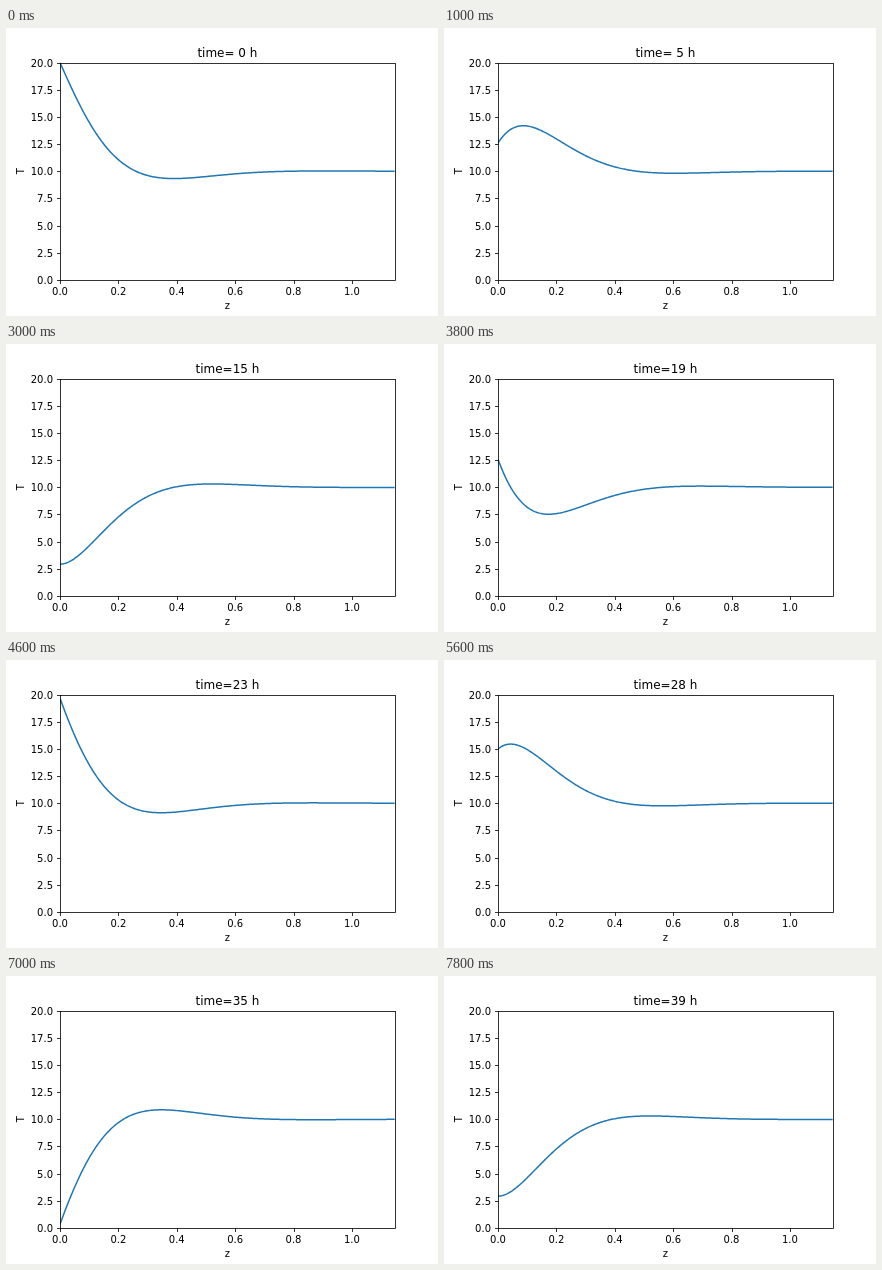
Animation of 432x288 px, one loop 8000 ms. Source, as an HTML page with a canvas:

```html
<!DOCTYPE html>
<html lang="en">
<head>
<meta charset="utf-8">
<title>Damped temperature wave</title>
<style>
  html, body { margin: 0; width: 100%; height: 100%; overflow: hidden; background: #fff; }
  canvas { display: block; }
</style>
</head>
<body>
<canvas id="plot" width="432" height="288"></canvas>
<script>
const ctx = document.getElementById('plot').getContext('2d');
const LEFT = 54, RIGHT = 388.8, TOP = 34.56, BOTTOM = 252;
const Z_MAX = 1.147, T_MAX = 20, DEPTH = 0.1658;
const HOUR_MS = 200, LOOP_HOURS = 40;

const xOf = z => LEFT + z / Z_MAX * (RIGHT - LEFT);
const yOf = T => BOTTOM - T / T_MAX * (BOTTOM - TOP);
const snap = v => Math.round(v) + 0.5;

// Daily surface cycle, decaying and lagging with depth
const temperature = (z, hour) =>
  10 + 10 * Math.exp(-z / DEPTH) * Math.cos(2 * Math.PI * hour / 24 - z / DEPTH);

function text(str, x, y, align = 'center', size = 10) {
  ctx.font = `${size}px "DejaVu Sans", sans-serif`;
  ctx.textAlign = align;
  ctx.fillText(str, x, y);
}

function line(x1, y1, x2, y2) {
  ctx.beginPath();
  ctx.moveTo(x1, y1);
  ctx.lineTo(x2, y2);
  ctx.stroke();
}

function drawCurve(hour) {
  ctx.save();
  ctx.beginPath();
  ctx.rect(LEFT, TOP, RIGHT - LEFT, BOTTOM - TOP);
  ctx.clip();
  ctx.beginPath();
  for (let i = 0; i <= 300; i++) {
    const z = Z_MAX * i / 300;
    ctx.lineTo(xOf(z), yOf(temperature(z, hour)));
  }
  ctx.strokeStyle = '#1f77b4';
  ctx.lineWidth = 1.5;
  ctx.lineJoin = 'round';
  ctx.stroke();
  ctx.restore();
}

function drawAxes() {
  const left = snap(LEFT), right = snap(RIGHT), top = snap(TOP), bottom = snap(BOTTOM);
  ctx.strokeStyle = ctx.fillStyle = '#000';
  ctx.lineWidth = 0.8;
  ctx.strokeRect(left, top, right - left, bottom - top);

  for (let i = 0; i <= 5; i++) {
    const x = xOf(i / 5);
    line(snap(x), bottom, snap(x), bottom + 3.5);
    text((i / 5).toFixed(1), x, 267);
  }
  for (let T = 0; T <= T_MAX; T += 2.5) {
    const y = yOf(T);
    line(left, snap(y), left - 3.5, snap(y));
    text(T.toFixed(1), 47, Math.round(y + 4), 'right');
  }

  text('z', (LEFT + RIGHT) / 2, 281);
  ctx.save();
  ctx.translate(18, (TOP + BOTTOM) / 2);
  ctx.rotate(-Math.PI / 2);
  text('T', 0, 0);
  ctx.restore();
}

function frame(now) {
  const hour = Math.floor(now / HOUR_MS) % LOOP_HOURS;
  ctx.fillStyle = '#fff';
  ctx.fillRect(0, 0, 432, 288);
  drawCurve(hour);
  drawAxes();
  text(`time=${String(hour).padStart(2)} h`, (LEFT + RIGHT) / 2, 29, 'center', 12);
  requestAnimationFrame(() => frame(performance.now() - start));
}

const start = performance.now();
frame(0);
</script>
</body>
</html>
```
